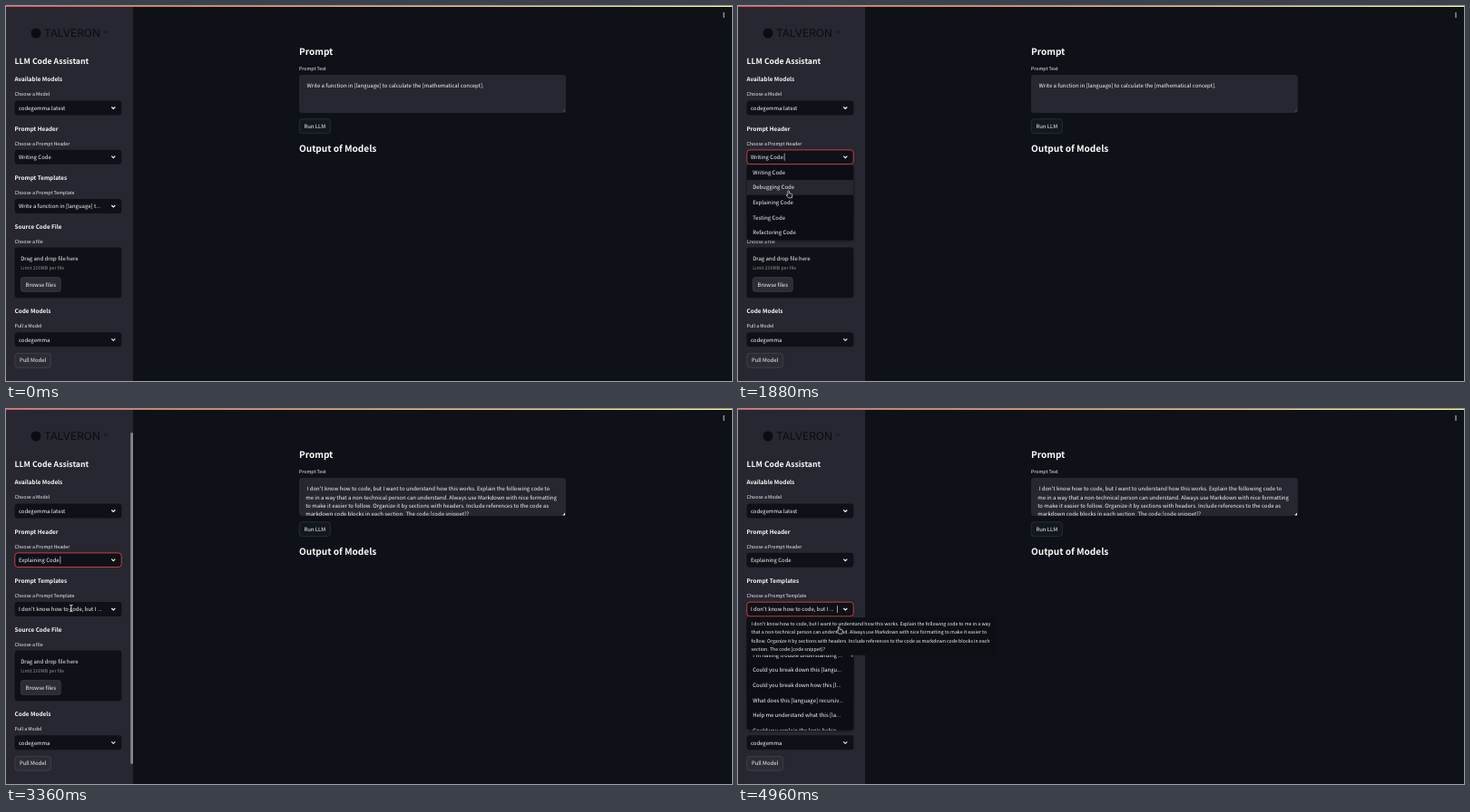
An HTML page for the animation above (5000 ms loop, 800 px wide and 414 px high).

```html
<!DOCTYPE html>
<html lang="en">
<head>
<meta charset="utf-8">
<title>LLM Code Assistant</title>
<style>
html, body { margin: 0; width: 100%; height: 100%; overflow: hidden; background: #0e1117; }
svg { display: block; width: 100vw; height: 100vh; }
text { font-family: "Noto Sans CJK JP", "Noto Sans CJK SC", "Noto Sans", sans-serif; fill: #fafafa; text-rendering: geometricPrecision; white-space: pre; }
</style>
</head>
<body>
<svg id="stage" viewBox="0 0 800 414" preserveAspectRatio="none">
  <defs>
    <linearGradient id="bar"><stop offset="0" stop-color="#ff4b4b"/><stop offset="1" stop-color="#fffd80"/></linearGradient>
    <clipPath id="areaClip"><rect x="323" y="76" width="294" height="41.8"/></clipPath>
    <clipPath id="listClip"><rect x="9.8" y="229.7" width="117.4" height="125"/></clipPath>
    <filter id="shadow" x="-20%" y="-20%" width="140%" height="140%">
      <feDropShadow dx="0" dy="1" stdDeviation="1.6" flood-color="#000" flood-opacity=".4"/>
    </filter>
  </defs>
</svg>
<script>
const LOOP = 5000, STEP = 40;
const BG = '#0e1117', PANEL = '#262730', RED = '#ff4b4b';
const BODY = 5.97, SMALL = 5.22, ROW = 16.67;
const stage = document.getElementById('stage');

function el(tag, attrs, parent = stage) {
  const node = document.createElementNS('http://www.w3.org/2000/svg', tag);
  for (const k in attrs) node.setAttribute(k, attrs[k]);
  parent.appendChild(node);
  return node;
}
const group = (attrs = {}, parent = stage) => el('g', attrs, parent);
const rect = (x, y, width, height, fill, rx = 0, parent = stage, more = {}) =>
  el('rect', { x, y, width, height, fill, rx, ...more }, parent);
function text(str, x, y, size = BODY, parent = stage, more = {}) {
  const node = el('text', { x, y, 'font-size': size, ...more }, parent);
  node.textContent = str;
  return node;
}
const bold = (str, x, y, size) => text(str, x, y, size, stage, { 'font-weight': 700 });
const show = (node, on) => node.setAttribute('visibility', on ? 'visible' : 'hidden');
const clamp = v => Math.max(0, Math.min(1, v));
const within = (t, a, b) => t >= a && t < b;

function button(label, x, y, w, fill) {
  rect(x, y, w, 15.8, fill, 3.2, stage, { stroke: '#fafafa', 'stroke-opacity': .2, 'stroke-width': .5 });
  text(label, x + w / 2, y + 10, BODY, stage, { 'text-anchor': 'middle' });
}

function select(y, value) {
  rect(9.6, y - 8, 117.8, 16, BG, 3.3);
  const border = rect(9.8, y - 7.8, 117.4, 15.6, 'none', 3.2, stage, { stroke: RED, 'stroke-width': .75, opacity: 0 });
  const label = text(value, 13.9, y + 2.3);
  el('path', { d: `M116.3 ${y - 1}l2 2 2-2`, fill: 'none', stroke: '#fafafa', 'stroke-width': 1.1 });
  const caret = rect(51, y - 4, .6, 8, '#fafafa');
  show(caret, false);
  return { border, label, caret };
}

function list(y, height, items, clip) {
  const box = group();
  rect(9.8, y, 117.4, height, BG, 2.5, box, { filter: 'url(#shadow)' });
  const inner = group(clip ? { 'clip-path': clip } : {}, box);
  const hot = rect(9.8, y, clip ? 114.6 : 117.4, ROW, PANEL, 0, inner);
  items.forEach((s, i) => text(s, 16.2, y + ROW * i + 10.5, BODY, inner));
  return {
    box,
    set(on, row) {
      box.setAttribute('display', on ? 'inline' : 'none');
      hot.setAttribute('display', row < 0 ? 'none' : 'inline');
      hot.setAttribute('y', y + ROW * row);
    }
  };
}

// Page and sidebar
rect(0, 0, 800, 414, BG);
rect(0, 0, 140, 414, PANEL);
rect(0, 0, 800, 1, 'url(#bar)');
[7.9, 10, 12.1].forEach(cy => el('circle', { cx: 791, cy, r: .75, fill: '#fafafa' }));

el('circle', { cx: 33, cy: 30, r: 5.5, fill: '#0c0d12' });
const brand = { style: 'font-family: Inter, sans-serif; fill: #0c0d12' };
text('TALVERON', 42, 34.2, 11.9, stage, brand);
text('AI', 108, 29.5, 4, stage, brand);

bold('LLM Code Assistant', 9.6, 63.9, 8.65);
[['Available Models', 83.3], ['Prompt Header', 137.6], ['Prompt Templates', 191.8],
 ['Source Code File', 246], ['Code Models', 339.2]].forEach(([s, y]) => bold(s, 9.6, y, 6.38));
[['Choose a Model', 99.4], ['Choose a Prompt Header', 153.7], ['Choose a Prompt Template', 207.9],
 ['Choose a file', 262], ['Pull a Model', 355]].forEach(([s, y]) => text(s, 9.6, y, SMALL));

select(112.5, 'codegemma:latest');
const header = select(166.7, 'Writing Code');
const template = select(221, '');
select(368.3, 'codegemma');
template.caret.setAttribute('x', 109.3);

rect(9.6, 266.6, 117.8, 55.6, BG, 3.3);
text('Drag and drop file here', 16.2, 281.1);
text('Limit 200MB per file', 16.2, 291.3, SMALL, stage, { 'fill-opacity': .55 });
button('Browse files', 16.2, 299.6, 44.2, '#2b2c36');
button('Pull Model', 9.8, 383.4, 39.6, '#2b2c36');
const scrollbar = rect(137.2, 26, 2.8, 366, '#84858c', 1.4);

// Main column
bold('Prompt', 323, 54.1, 10.06);
text('Prompt Text', 323, 71, SMALL);
rect(323, 76, 294, 42, PANEL, 3.3);
button('Run LLM', 323.2, 124.8, 34.2, '#131720');
bold('Output of Models', 323, 161.2, 10.06);

const shortPrompt = group();
text('Write a function in [language] to calculate the [mathematical concept].', 331.6, 90.2, BODY, shortPrompt);
el('path', { d: 'M613.4 116.6l2.4-2.4M614.9 116.6l.9-.9', stroke: '#8a8b92', 'stroke-width': .4 }, shortPrompt);

const longPrompt = group({ 'clip-path': 'url(#areaClip)' });
["I don't know how to code, but I want to understand how this works. Explain the following code to",
 'me in a way that a non-technical person can understand. Always use Markdown with nice formatting',
 'to make it easier to follow. Organize it by sections with headers. Include references to the code as',
 'markdown code blocks in each section. The code:[code snippet]?'
].forEach((s, i) => text(s, i ? 330.2 : 331.6, 90.2 + 9.33 * i, BODY, longPrompt));
el('path', { d: 'M613.2 117.4h2.8v-2.8z', fill: '#fafafa' }, longPrompt);

// Drop-down lists and tooltip
const headerList = list(175.3, ROW * 5, ['Writing Code', 'Debugging Code', 'Explaining Code', 'Testing Code', 'Refactoring Code']);
const templateList = list(229.7, 125, [
  "I don't know how to code, but I wa...", 'Can you explain what this [langua...',
  "I'm having trouble understanding ...", 'Could you break down this [langu...',
  'Could you break down how this [l...', 'What does this [language] recursiv...',
  'Help me understand what this [la...', 'Could you explain the logic behin...'
], 'url(#listClip)');
rect(124.6, 231, 2.4, 43, '#5d5e66', 1.2, templateList.box);

const tip = group();
rect(9.8, 230.2, 273.5, 41.6, '#0d0f15', 2, tip);
["I don't know how to code, but I want to understand how this works. Explain the following code to me in a way",
 'that a non-technical person can understand. Always use Markdown with nice formatting to make it easier to',
 'follow. Organize it by sections with headers. Include references to the code as markdown code blocks in each',
 'section. The code:[code snippet]?'
].forEach((s, i) => text(s, 14.6, 239 + 9.33 * i, SMALL, tip));

// Pointer
const pointer = group();
const shapes = {
  arrow: el('path', { d: 'M0 0v6.6l1.6-1.4 1 2.3 1-.4-1-2.3h2.1z', fill: '#111', stroke: '#fff', 'stroke-width': .5 }, pointer),
  beam: el('path', { d: 'M-1.7-3.6q1.7 0 1.7 .8 0-.8 1.7-.8M0-3v6M-1.7 3.6q1.7 0 1.7-.8 0 .8 1.7 .8', fill: 'none', stroke: '#fff', 'stroke-width': .8 }, pointer),
  hand: el('path', { d: 'M-.8.6q.8-1.2 1.6 0v2.6l2.5.5q1 .3.9 1.3l-.5 3.2h-3.9l-2.5-3q.3-1 1.9 0z', fill: '#15161c', stroke: '#fff', 'stroke-width': .6 }, pointer)
};
const path = [
  [800, 133, 142], [1280, 65.5, 168], [1600, 65.5, 168], [2000, 53, 213.5], [2240, 52.5, 213.5],
  [2560, 64, 222], [2880, 71.8, 220], [3480, 71.8, 220], [3800, 81.6, 240.8], [3900, 81.6, 240.8],
  [4200, 110, 285], [4400, 113.7, 271], [4640, 111.2, 240], [5000, 111.2, 240]
];

function pointerAt(t) {
  const i = Math.max(1, path.findIndex(p => p[0] >= t));
  const [t0, x0, y0] = path[i - 1], [t1, x1, y1] = path[i];
  const u = clamp((t - t0) / (t1 - t0)), k = u * u * (3 - 2 * u);
  return [x0 + (x1 - x0) * k, y0 + (y1 - y0) * k];
}
function pointerShape(t) {
  if (t < 1180) return 'arrow';
  return t < 1640 || within(t, 2320, 3600) ? 'beam' : 'hand';
}

function draw(t) {
  const [x, y] = pointerAt(t), shape = pointerShape(t);
  pointer.setAttribute('transform', `translate(${x} ${y})`);
  for (const k in shapes) show(shapes[k], t >= 800 && k === shape);
  show(scrollbar, within(t, 800, 1560) || within(t, 2320, 3700));

  const swapped = t >= 2440;
  header.label.textContent = t < 2160 ? 'Writing Code' : 'Explaining Code';
  template.label.textContent = swapped ? "I don't know how to code, but I ..." : 'Write a function in [language] t...';
  show(shortPrompt, !swapped);
  show(longPrompt, swapped);

  const moved = clamp((t - 3440) / 160);
  header.border.setAttribute('opacity', clamp((t - 1440) / 140) * (1 - moved));
  template.border.setAttribute('opacity', moved);
  header.caret.setAttribute('x', t < 2160 ? 50.8 : 59.6);
  show(header.caret, within(t, 1480, 1980) || within(t, 2160, 2640) || within(t, 3120, 3480));
  show(template.caret, within(t, 3480, 3720) || within(t, 4200, 4720) || t >= 4880);

  headerList.set(within(t, 1540, 2160), Math.max(0, Math.min(2, Math.floor((y - 175.3) / ROW))));
  const row = Math.max(0, Math.min(3, Math.floor((y - 229.7) / ROW)));
  templateList.set(t >= 3520, t < 4200 ? row : t < 4520 ? 3 : -1);
  show(tip, t >= 4080);
}

function tick() {
  const t = performance.now() % LOOP;
  draw(Math.floor(t / STEP) * STEP);
  requestAnimationFrame(tick);
}
tick();
</script>
</body>
</html>
```
